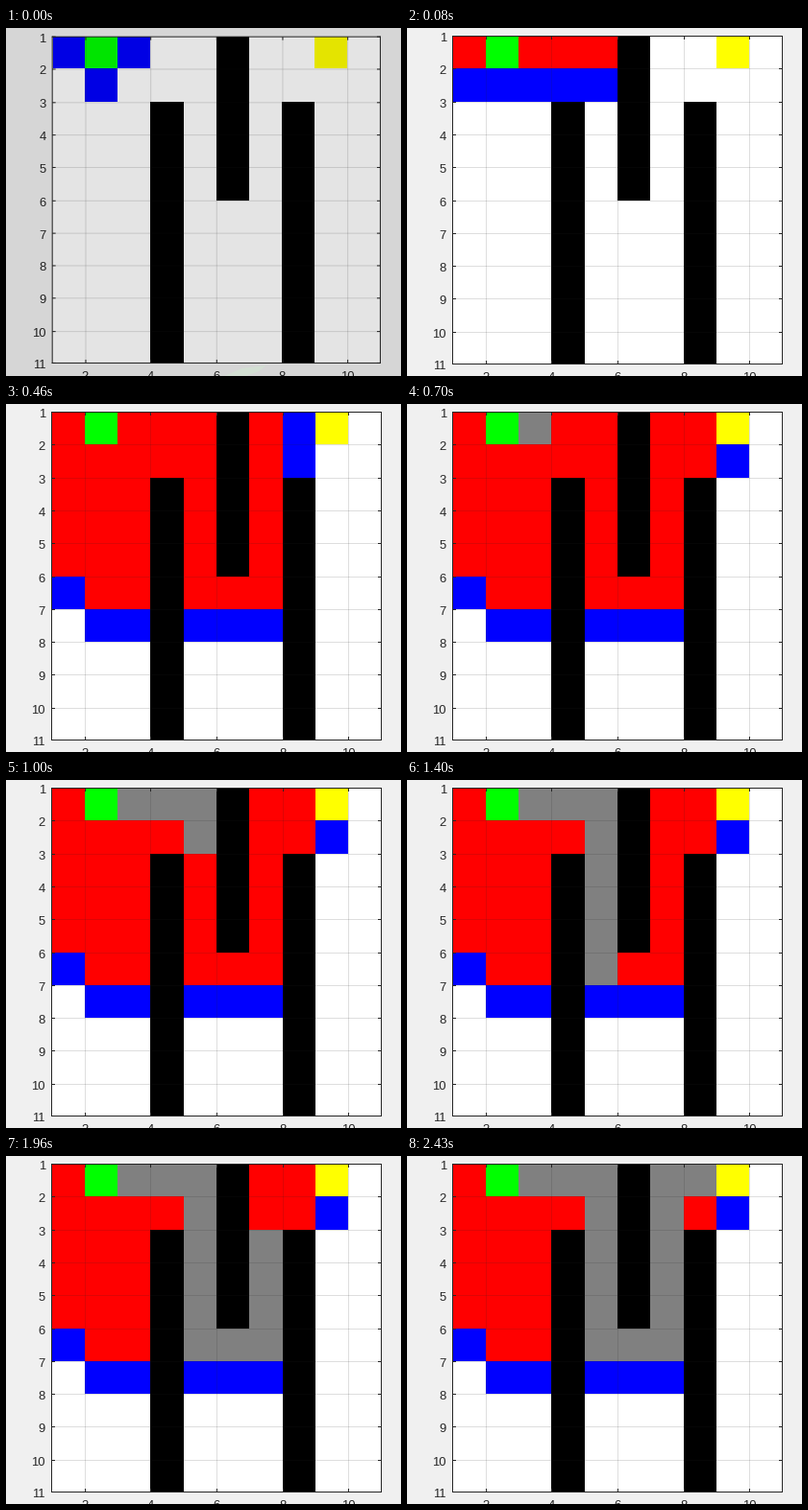
Animation, 411 px wide and 363 px high, one loop 2.82 s. Source, as a matplotlib script:

```python
import numpy as np
import matplotlib.pyplot as plt
from matplotlib.animation import FuncAnimation
from matplotlib.colors import ListedColormap
from matplotlib.patches import Polygon, Rectangle

W, H, DPI = 411, 363, 64
PX = 72 / DPI                      # one pixel in points
LOOP, STEP = 2820, 10              # ms
N = 10
INK = (0.15, 0.15, 0.15)

FREE, WALL, OPEN, CLOSED, PATH, START, GOAL = range(7)
COLORS = ["#ffffff", "#000000", "#0000ff", "#ff0000", "#808080", "#00ff00", "#ffff00"]

start, goal = (0, 1), (0, 8)       # (row, column)
maze = np.full((N, N), FREE)
maze[2:, 3] = maze[:5, 5] = maze[2:, 7] = WALL


def neighbours(cell):
    for dr, dc in ((0, 1), (1, 0), (0, -1), (-1, 0)):
        r, c = cell[0] + dr, cell[1] + dc
        if 0 <= r < N and 0 <= c < N and maze[r, c] != WALL:
            yield r, c


def search():
    """A* with Manhattan distance; ties go to the lowest column, then row."""
    cost, parent = {start: 0}, {}
    frontier, order = {start}, []

    def rank(cell):
        r, c = cell
        return cost[cell] + abs(r - goal[0]) + abs(c - goal[1]), c, r

    while True:
        cell = min(frontier, key=rank)
        if cell == goal:
            break
        frontier.remove(cell)
        order.append(cell)
        for nxt in neighbours(cell):
            if nxt not in cost:
                cost[nxt] = cost[cell] + 1
                parent[nxt] = cell
                frontier.add(nxt)
    path = []
    while parent[cell] != start:
        cell = parent[cell]
        path.append(cell)
    return order, path[::-1]


order, path = search()

# (time, cells expanded so far) and the moment each path cell appears
EXPANDED = [(0, 1), (80, 5), (140, 9), (220, 15), (300, 21), (380, 26), (460, 32), (550, 34)]
PATH_TIMES = [700, 780, 840, 1000, 1080, 1240, 1320, 1400,
              1560, 1640, 1800, 1880, 1960, 2110, 2190, 2430]

# while the window fades in it is slightly smaller, about this point
FADE_END, FADE_SCALE = 80, 0.995
CX, CY = 180, 140


def grid_at(t):
    grid = maze.copy()
    done = order[:max(n for at, n in EXPANDED if at <= t)]
    for cell in done:
        for nxt in neighbours(cell):
            grid[nxt] = OPEN
    for cell in done:
        grid[cell] = CLOSED
    for cell, at in zip(path, PATH_TIMES):
        if at <= t:
            grid[cell] = PATH
    grid[start], grid[goal] = START, GOAL
    return grid


fig = plt.figure(figsize=(W / DPI, H / DPI), dpi=DPI, facecolor="#f0f0f0")
ax = fig.add_axes([0, 0, 1, 1])
ax.axis("off")

xe = np.round(47.5 + 34.3 * np.arange(N + 1))
ye = np.round(8.05 + 34.3 * np.arange(N + 1))
mesh = ax.pcolormesh(xe, ye, grid_at(0), cmap=ListedColormap(COLORS),
                     vmin=-0.5, vmax=6.5, zorder=1)

# line centres sit on half pixels, so snapping stays off
left, right, top, bottom = 47.5, 390.5, 8.5, 350.5
xt = xe[1::2] + 0.5
yt = np.minimum(ye + 0.5, bottom)
line = dict(colors=[INK], linewidths=PX, snap=False)

ax.vlines(xt, top, bottom, alpha=0.15, zorder=2, **line)
ax.hlines(yt[1:-1], left, right, alpha=0.15, zorder=2, **line)
ax.vlines([left, right], top - 0.5, bottom + 0.5, zorder=3, **line)
ax.hlines([top, bottom], left - 0.5, right + 0.5, zorder=3, **line)
for edge, d in ((top, 3.5), (bottom, -3.5)):
    ax.vlines(xt, edge, edge + d, zorder=3, **line)
for edge, d in ((left, 3.5), (right, -3.5)):
    ax.hlines(yt, edge, edge + d, zorder=3, **line)

font = dict(family="Liberation Sans", size=13 * PX, color=INK, va="baseline")
for i, y in enumerate(yt):
    ax.text(41, y + 5.5, str(i + 1), ha="right", **font)
for i, x in enumerate(xt):
    ax.text(x - 0.5, 368, str(2 * i + 2), ha="center", **font)

# dimming, with a hint of what lies behind the window
veil = [
    ax.add_patch(Rectangle((-9, -9), W + 18, H + 18, fc="black", lw=0, alpha=0.105, zorder=8)),
    ax.add_patch(Polygon([(228, 364), (246, 356), (271, 353), (264, 359), (250, 364)],
                         fc="#d2e6d2", lw=0, alpha=0.6, zorder=9)),
]


def update(i):
    t = i * STEP
    fading = t < FADE_END
    s = FADE_SCALE if fading else 1
    ax.set_xlim(CX - CX / s, CX + (W - CX) / s)
    ax.set_ylim(CY + (H - CY) / s, CY - CY / s)
    for patch in veil:
        patch.set_visible(fading)
    mesh.set_array(grid_at(t))
    return [mesh, *veil]


anim = FuncAnimation(fig, update, frames=LOOP // STEP, interval=STEP,
                     repeat=True, repeat_delay=0, blit=False)
plt.show()
```
